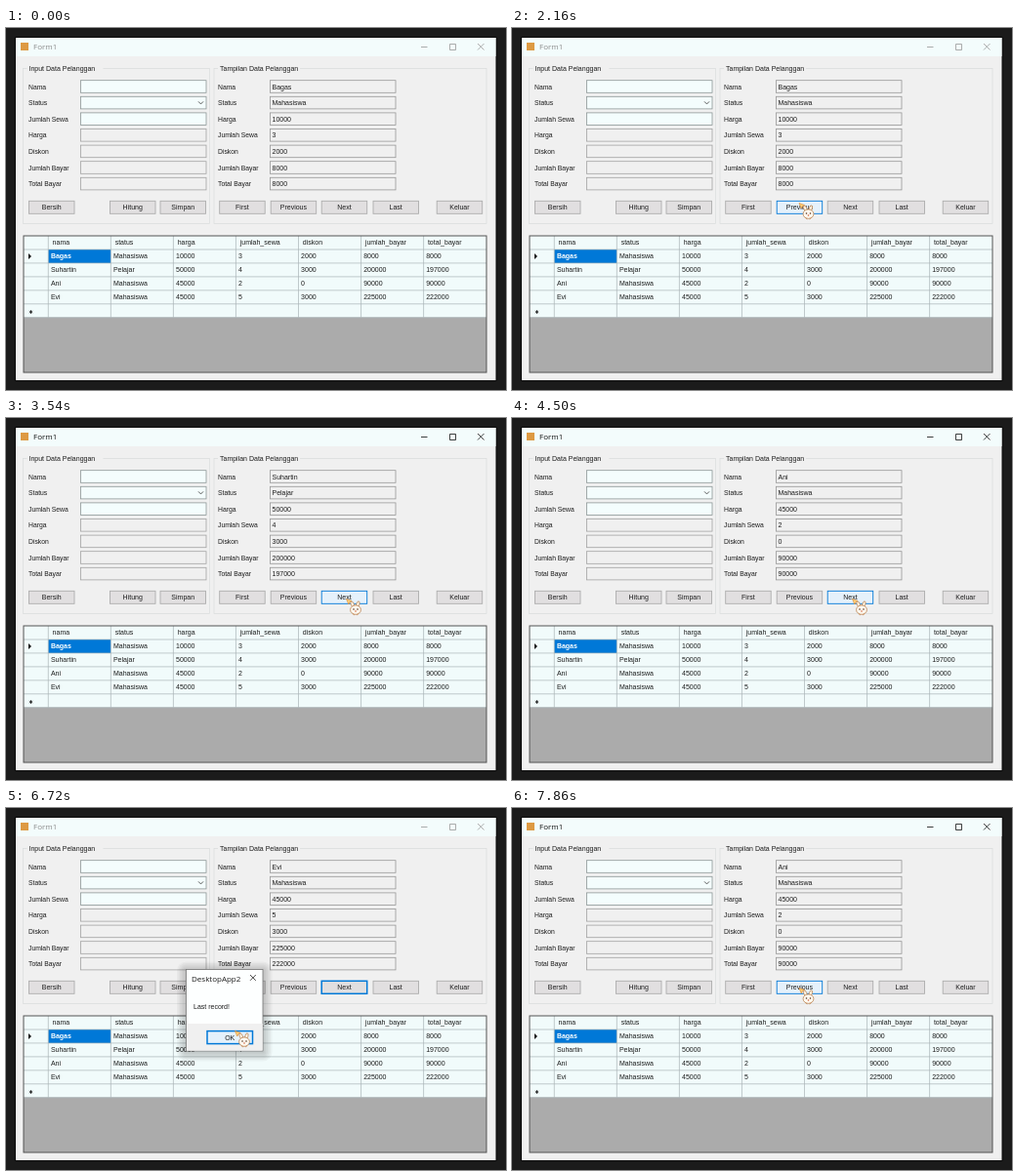
An HTML page for the animation above (8000 ms loop, 512x371 px).

```html
<!DOCTYPE html>
<html lang="id">
<head>
<meta charset="utf-8">
<style>
html, body { margin: 0; width: 100%; height: 100%; overflow: hidden; background: #1b1b1b; }
svg { display: block; width: 100vw; height: 100vh; }
text { font: 7px "Liberation Sans", Arial, sans-serif; fill: #1c1c1c; white-space: pre; }
.label { font-size: 6.8px; }
.title { font: 8px "Open Sans", "Noto Sans", sans-serif; }
.mid { text-anchor: middle; }
</style>
</head>
<body>
<svg id="stage" viewBox="0 0 512 371" preserveAspectRatio="none"></svg>
<script>
const LOOP = 8000, STEP = 60;
const BLUE = '#0078d7', FACE = '#f0f0f0', PALE = '#f1fbfb';
const stage = document.getElementById('stage');

const HEADS = ['nama', 'status', 'harga', 'jumlah_sewa', 'diskon', 'jumlah_bayar', 'total_bayar'];
const ROWS = [
  ['Bagas', 'Mahasiswa', '10000', '3', '2000', '8000', '8000'],
  ['Suhartin', 'Pelajar', '50000', '4', '3000', '200000', '197000'],
  ['Ani', 'Mahasiswa', '45000', '2', '0', '90000', '90000'],
  ['Evi', 'Mahasiswa', '45000', '5', '3000', '225000', '222000']
];
const LABELS = ['Nama', 'Status', 'Jumlah Sewa', 'Harga', 'Diskon', 'Jumlah Bayar', 'Total Bayar'];
const VIEW = ['Nama', 'Status', 'Harga', 'Jumlah Sewa', 'Diskon', 'Jumlah Bayar', 'Total Bayar'];

function add(parent, tag, attrs, content) {
  const el = document.createElementNS('http://www.w3.org/2000/svg', tag);
  set(el, attrs);
  if (content !== undefined) el.textContent = content;
  parent.appendChild(el);
  return el;
}
function set(el, attrs) {
  for (const k in attrs) el.setAttribute(k, attrs[k]);
}
const rect = (p, x, y, width, height, fill, stroke = 'none', sw = 0.8) =>
  add(p, 'rect', { x, y, width, height, fill, stroke, 'stroke-width': sw });
const path = (p, d, stroke, sw = 0.8, fill = 'none') =>
  add(p, 'path', { d, stroke, fill, 'stroke-width': sw });
const text = (p, x, y, s, cls = '') => add(p, 'text', { x, y, class: cls }, s);

function button(p, x, y, label) {
  const box = rect(p, x, y, 46.5, 13, '#e1dfe0', '#adadad');
  text(p, x + 23.2, y + 9, label, 'mid');
  return { x, y, box };
}
function group(x, w, titleW, title) {
  rect(stage, x, 41.5, w, 159, 'none', '#d9dcdc', 0.7);
  rect(stage, x + 4, 39, titleW, 5, FACE);
  text(stage, x + 6, 44, title);
}
const rowY = i => 54 + i * 16.6;

// Window frame
rect(stage, 0, 0, 512, 371, '#1b1b1b');
rect(stage, 9.5, 9.5, 492.5, 352, FACE, '#0c0c0c', 1);
rect(stage, 10, 10, 491.5, 19, '#f3fcfc');
rect(stage, 15, 15, 8, 8, '#dd9a43');
const caption = text(stage, 28, 22.3, 'Form1', 'title');
const controls = path(stage,
  'M425 19.5h6.5M454.5 16.5h6v6h-6zM483 16l6.5 6.5M489.5 16l-6.5 6.5', '#999', 0.8);

// Input form
group(17.5, 191, 78, 'Input Data Pelanggan');
LABELS.forEach((s, i) => {
  text(stage, 23, rowY(i) + 8.6, s, 'label');
  rect(stage, 76.5, rowY(i) - 0.3, 128.5, 12.6, i < 3 ? '#f4fdfd' : FACE, i < 3 ? '#8d9696' : '#a3a3a3');
});
path(stage, 'M197 75.4l2.5 2.5l2.5-2.5', '#444', 0.9);

// Record view
group(213, 279, 84, 'Tampilan Data Pelanggan');
const fields = VIEW.map((s, i) => {
  const y = rowY(i) - 0.3;
  text(stage, 217, y + 8.9, s, 'label');
  const box = rect(stage, 270.5, y, 128.5, 12.6, FACE, '#979797');
  return { y, box, value: text(stage, 272.5, y + 8.9, '') };
});

const buttons = {};
[['Bersih', 23.5], ['Hitung', 106.5], ['Simpan', 158], ['First', 218.7], ['Previous', 271.2],
  ['Next', 323.2], ['Last', 376], ['Keluar', 441.2]]
  .forEach(([s, x]) => { buttons[s] = button(stage, x, 177.3, s); });

// Table
const colX = i => 43.3 + i * 64.05;
rect(stage, 18, 213, 474, 140, '#ababab');
rect(stage, 18, 213, 474, 83.5, PALE);
rect(stage, 43.3, 227, 64, 14, BLUE);
let lines = '';
for (let i = 0; i < 6; i++) lines += `M18 ${227 + i * 13.95}H492`;
for (let i = 0; i < 7; i++) lines += `M${colX(i)} 213V296.7`;
path(stage, lines, '#a9b4b6', 0.7);
HEADS.forEach((s, i) => text(stage, colX(i) + 4.3, 222.3, s));
ROWS.forEach((row, r) => row.forEach((s, i) => {
  const cell = text(stage, colX(i) + 2.6, 236.4 + r * 14, s);
  if (!r && !i) cell.style.cssText = 'fill:#fff;font-weight:bold';
}));
path(stage, 'M23 231l3 3l-3 3z', 'none', 0, '#111');
path(stage, 'M25.5 289v4M23.8 290l3.4 2M27.2 290l-3.4 2', '#111', 0.7);
rect(stage, 18, 213, 474, 140, 'none', '#555', 1);

// Message box
const dialog = add(stage, 'g', {});
for (let i = 6; i > 0; i--) {
  add(dialog, 'rect', {
    x: 184.5 - i * 1.6, y: 167 - i * 1.6, width: 78.5 + i * 3.2, height: 83 + i * 3.2,
    rx: i * 1.6, fill: '#000', opacity: 0.035
  });
}
rect(dialog, 184.5, 165.5, 78.5, 83.5, '#fdffff', '#777', 0.8);
rect(dialog, 185, 221, 77.6, 27.6, FACE);
text(dialog, 190, 177.8, 'DesktopApp2', 'title');
path(dialog, 'M250 171l5.8 5.8M255.8 171l-5.8 5.8', '#222', 0.8);
text(dialog, 192, 206, 'Last record!');
const ok = button(dialog, 206, 228.6, 'OK');

// Bunny pointer, tip at 0,0
const pointer = add(stage, 'g', {});
path(pointer, 'M0.5 0.5l5.5 2l-2.2 1.2l-1 2.3z', '#d9852c', 0.6, '#ffd27a');
const ear = (cx, cy, a) => add(pointer, 'ellipse', {
  cx, cy, rx: 1.5, ry: 3.3, fill: '#fff6e6', stroke: '#b88150', 'stroke-width': 0.7,
  transform: `rotate(${a} ${cx} ${cy})`
});
ear(6.8, 6, -22);
ear(12.3, 6, 18);
add(pointer, 'ellipse', { cx: 10, cy: 11.6, rx: 5.4, ry: 4.7, fill: '#fffaf0', stroke: '#b88150', 'stroke-width': 0.8 });
[[8, 11, '#54301c'], [12, 11, '#54301c'], [10, 13, '#d0603c']].forEach(([cx, cy, fill]) =>
  add(pointer, 'circle', { cx, cy, r: 0.8, fill }));
path(pointer, 'M7 15.5l1.8 1.4M13 15.5l-1.8 1.4', '#c98c58', 0.9);

const MOVES = [
  [360, 510, 41], [480, 510, 41], [1200, 377, 85], [1500, 377, 85], [1620, 376, 83.5],
  [1740, 376, 83.5], [2160, 293.5, 179], [2580, 347, 184], [2940, 347, 184], [3120, 348, 185],
  [6240, 348, 185], [6720, 234, 228], [7140, 234, 228], [7800, 293.5, 184]
];
// time, record shown
const RECORDS = [[0, 0], [3540, 1], [4260, 2], [4980, 3], [7800, 2]];
const PRESSES = [[3480, 3540], [4140, 4260], [4920, 4980], [5580, 5640], [7020, 7080], [7740, 7800]];

const clamp = v => Math.max(0, Math.min(1, v));
const ramp = (t, a, b) => clamp((t - a) / (b - a));
const smooth = u => u * u * (3 - 2 * u);
const last = (list, t) => list.filter(k => k[0] <= t).pop();

function pointerAt(t) {
  const i = MOVES.findIndex(m => m[0] > t);
  if (i < 0) return MOVES[MOVES.length - 1].slice(1);
  if (!i) return null;
  const a = MOVES[i - 1], b = MOVES[i], u = smooth(ramp(t, a[0], b[0]));
  return [a[1] + (b[1] - a[1]) * u, a[2] + (b[2] - a[2]) * u];
}

function paint(b, hover, press, focus) {
  set(b.box, {
    fill: hover ? (press ? '#cce4f7' : '#e5f1fb') : '#e1dfe0',
    stroke: hover || focus ? BLUE : '#adadad',
    'stroke-width': focus && !hover ? 1.5 : 0.9
  });
}

function draw(ms) {
  const t = Math.floor(ms / STEP) * STEP;
  const pos = pointerAt(t);
  const modal = t >= 5700 && t < 7080;
  const press = PRESSES.some(p => t >= p[0] && t < p[1]);
  const over = (x, y, w, h) => pos && pos[0] + 1 > x && pos[0] + 1 < x + w
    && pos[1] + 4 > y && pos[1] + 4 < y + h;

  set(pointer, pos
    ? { transform: `translate(${pos[0]} ${pos[1]})`, visibility: 'visible' }
    : { visibility: 'hidden' });

  const active = t >= 3480 && !modal;
  caption.style.fill = active ? '#111' : '#8b8b8b';
  set(controls, { stroke: active ? '#111' : '#999' });

  const row = ROWS[last(RECORDS, t)[1]];
  fields.forEach((f, i) => {
    f.value.textContent = row[i];
    set(f.box, { stroke: !modal && over(270, f.y, 129, 12.6) ? '#444' : '#979797' });
  });

  const focus = t < 3480 ? '' : t < 7740 ? 'Next' : 'Previous';
  for (const s in buttons) {
    const b = buttons[s];
    paint(b, !modal && over(b.x, b.y, 46.5, 13), press, s === focus);
  }

  const shown = t < 7080 ? ramp(t, 5700, 5900) : 1 - ramp(t, 7080, 7200);
  const k = 0.95 + 0.05 * shown;
  set(dialog, {
    opacity: shown,
    visibility: shown ? 'visible' : 'hidden',
    transform: `translate(223.7 207) scale(${k}) translate(-223.7 -207)`
  });
  paint(ok, modal && over(ok.x, ok.y, 46.5, 13), press, true);
  if (modal) set(ok.box, { 'stroke-width': 1.5 });
}

function tick() {
  draw(performance.now() % LOOP);
  requestAnimationFrame(tick);
}
tick();
</script>
</body>
</html>
```
